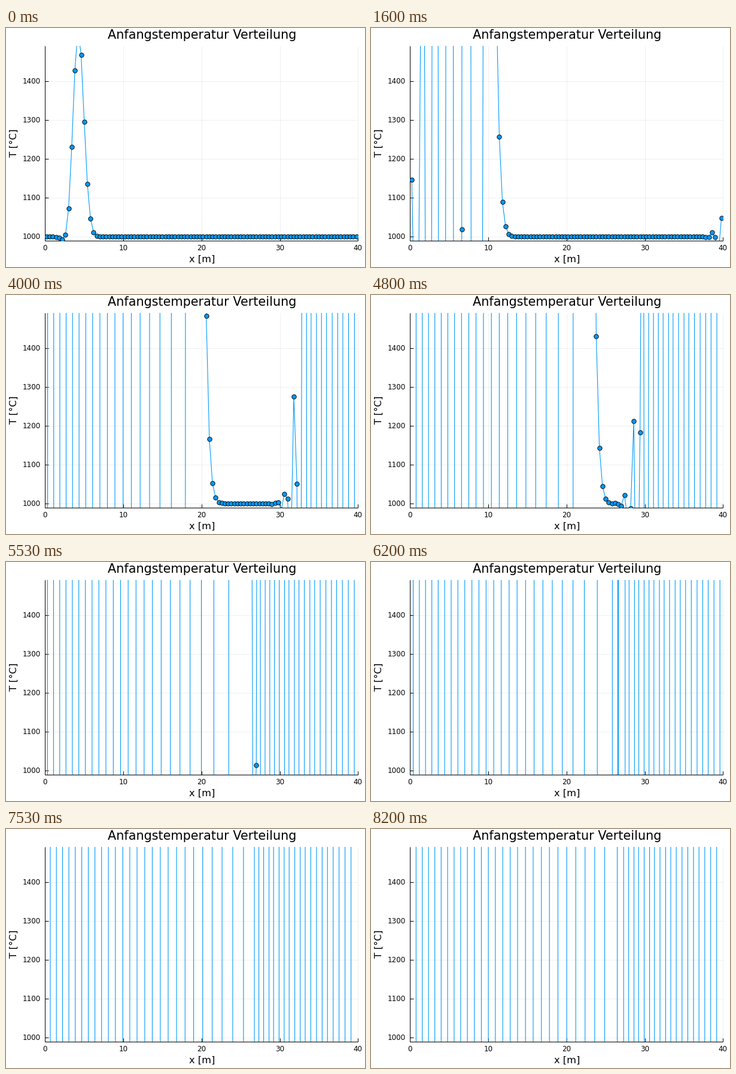
These frames come from a looping animation (600x400 px, 8270 ms). A matplotlib script:

```python
import numpy as np
import matplotlib.pyplot as plt
from matplotlib.animation import FuncAnimation

W, H, DPI = 600, 400, 100
LEFT, RIGHT, TOP, BOTTOM = 65.4, 588.2, 30.4, 355.6
T_MIN, T_MAX = 990, 1490
STEPS, LOOP_MS, TICK_MS = 124, 8270, 10
CELLS, LENGTH, COURANT = 100, 40, 0.8

plt.rcParams["font.family"] = "DejaVu Sans"


def px(n):
    """Pixels to points."""
    return n * 72 / DPI


def x_px(x):
    return LEFT + x / LENGTH * (RIGHT - LEFT)


def y_px(t):
    return BOTTOM - (t - T_MIN) / (T_MAX - T_MIN) * (BOTTOM - TOP)


def label(x, y, text, size, **kw):
    kw = {"ha": "center", "va": "baseline", **kw}
    page.text(x, y, text, fontsize=px(size), color="black", **kw)


def simulate():
    """Explicit central-difference advection on a periodic domain."""
    dx = LENGTH / CELLS
    x = (np.arange(CELLS) + 0.5) * dx
    rise = 500 * np.exp(-(x - 4) ** 2)
    states = []
    for _ in range(STEPS):
        rise = rise - COURANT / 2 * (np.roll(rise, -1) - np.roll(rise, 1))
        states.append(1000 + rise)
    return x, states


fig = plt.figure(figsize=(W / DPI, H / DPI), dpi=DPI, facecolor="white")

# Static page in pixel coordinates: grid, axes and text
page = fig.add_axes([0, 0, 1, 1])
page.set_xlim(0, W)
page.set_ylim(H, 0)
page.axis("off")

x_ticks = np.arange(0, 41, 10)
t_ticks = np.arange(1000, 1401, 100)
grid = dict(color="black", alpha=0.06, linewidth=px(1))
ink = dict(color="black", linewidth=px(1))
page.vlines(x_px(x_ticks), TOP, BOTTOM, **grid)
page.hlines(y_px(t_ticks), LEFT, RIGHT, **grid)
page.vlines(x_px(x_ticks), BOTTOM - 5.5, BOTTOM, **ink)
page.hlines(y_px(t_ticks), LEFT, LEFT + 5.5, **ink)
page.vlines(LEFT, TOP, BOTTOM, **ink)
page.hlines(BOTTOM, LEFT, RIGHT, **ink)

label(327.5, 18.3, "Anfangstemperatur Verteilung", 20.75)
label(327.3, 392, "x [m]", 16.3)
label(21, 192.8, "T [°C]", 16.3, rotation=90, ha="right", va="center")
for v in x_ticks:
    label(x_px(v), 371.6, str(v), 11.9)
for v in t_ticks:
    label(57.6, y_px(v) + 4.4, str(v), 11.9, ha="right")

ax = fig.add_axes([LEFT / W, 1 - BOTTOM / H,
                   (RIGHT - LEFT) / W, (BOTTOM - TOP) / H])
ax.set_xlim(0, LENGTH)
ax.set_ylim(T_MIN, T_MAX)
ax.axis("off")

x, states = simulate()
curve, = ax.plot(x, states[0], color="#009afa", linewidth=px(1.1), marker="o",
                 markersize=px(7.4), markeredgecolor="black",
                 markeredgewidth=px(0.9), snap=False)


def draw(i):
    # 15 steps per second, changes rounded to the 10 ms tick
    curve.set_ydata(states[(3 * i + 1) // 20])
    return curve,


anim = FuncAnimation(fig, draw, frames=LOOP_MS // TICK_MS, interval=TICK_MS,
                     repeat=True, repeat_delay=0, blit=False)
plt.show()
```
